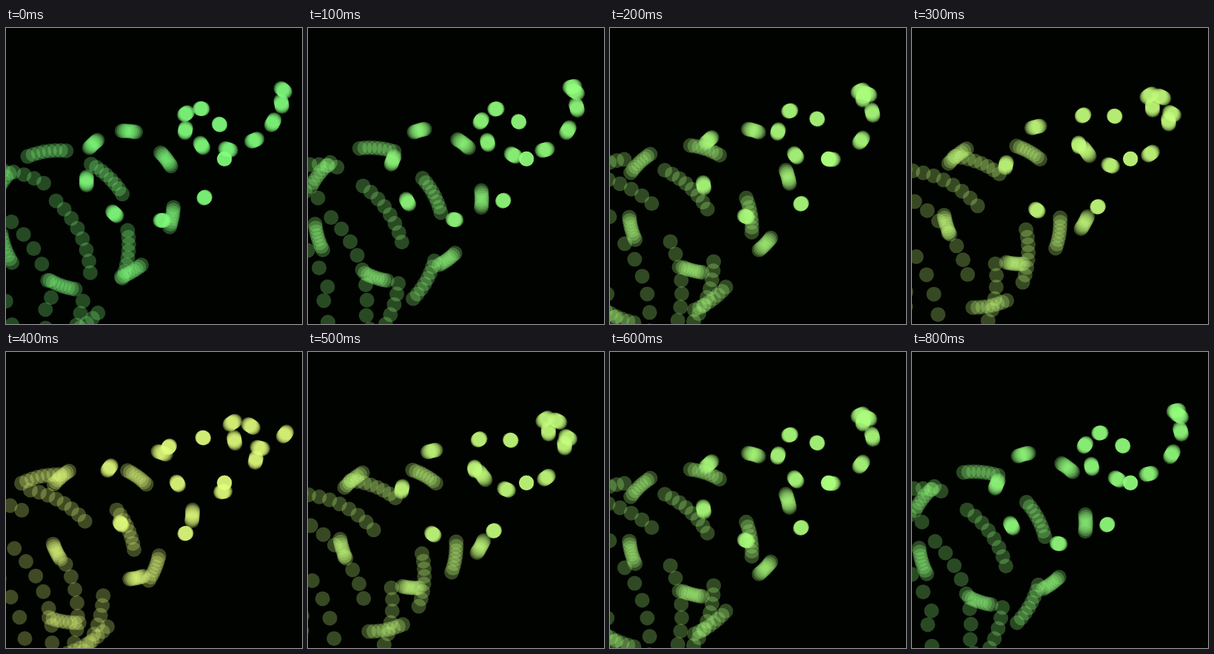
Write an HTML page with a canvas that moves like this. It is 400 by 400 pixels and loops after 0.9 s.

```html
<!DOCTYPE html>
<html>
<head>
<meta charset="utf-8">
<style>
  html, body { margin: 0; height: 100%; overflow: hidden; background: #010301; }
  canvas { display: block; }
</style>
</head>
<body>
<canvas id="stage" width="400" height="400"></canvas>
<script>
const ctx = document.getElementById('stage').getContext('2d');
const TWISTS = [0, 5.4, 11.71, 19, 27.33];    // degrees added per bead
const STEPS = [0, 1, 2, 3, 4, 3, 2, 2, 1];    // one entry per 100 ms
const COPIES = 8, COPY_STEP = 0.298, RADIUS = 10;
const RAD = Math.PI / 180;

// Bead n sits on a circle whose centre drifts and whose radius grows with n.
function drawBead(n, twist) {
  const cx = 235.2 - 12.62 * n;
  const cy = 176.5 + 7.77 * n;
  const r = 60 + 4 * n;
  for (let j = 0; j < COPIES; j++) {
    const lag = (j - (COPIES - 1) / 2) * COPY_STEP;
    const a = (0.3 + n * (43.9 + 0.3 * n + twist + lag)) * RAD;
    ctx.beginPath();
    ctx.arc(cx + r * Math.cos(a), cy + r * Math.sin(a), RADIUS, 0, 2 * Math.PI);
    ctx.fill();
  }
}

function draw(twist) {
  ctx.fillStyle = '#010301';
  ctx.fillRect(0, 0, 400, 400);
  ctx.fillStyle = `rgba(${Math.round(130 + 3.5 * twist)}, 255, 125, 0.28)`;
  for (let n = -10; n < 37; n++) drawBead(n, twist);
}

const start = performance.now();
function tick() {
  const t = (performance.now() - start) % 900;
  draw(TWISTS[STEPS[Math.floor(t / 100)]]);
  requestAnimationFrame(tick);
}
tick();
</script>
</body>
</html>
```
